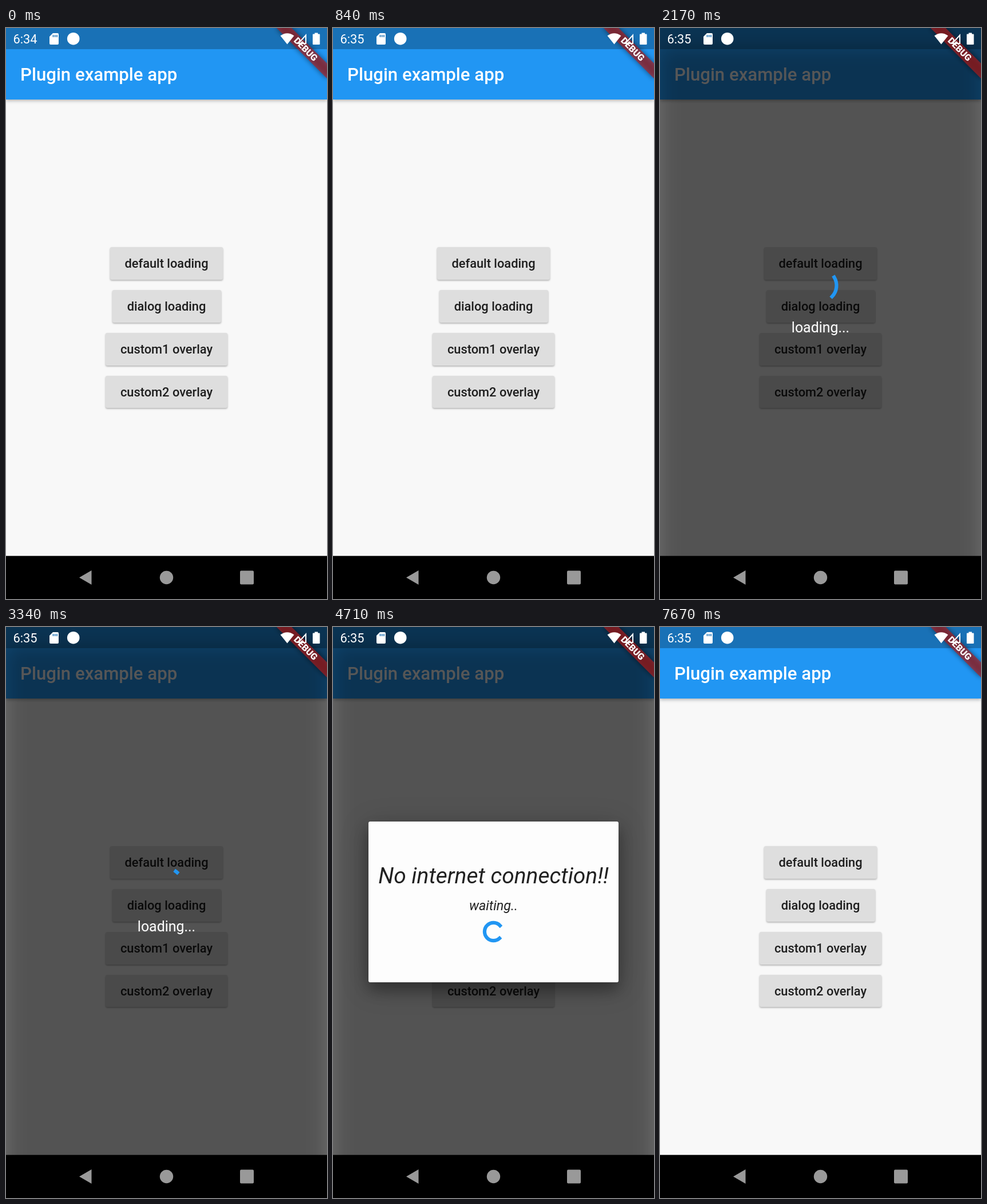
Write an HTML page that moves like this. It is 561 px wide and 998 px high and loops after 8 s.

```html
<!DOCTYPE html>
<html lang="en">
<head>
<meta charset="utf-8">
<style>
html, body { margin: 0; width: 100%; height: 100%; overflow: hidden; background: #000; }
#stage { position: relative; width: 561px; height: 998px; overflow: hidden; font-family: Roboto, sans-serif; }
#stage div, #stage svg { position: absolute; box-sizing: border-box; }
#app { width: 561px; height: 923px; background: #f8f8f8; overflow: hidden; }
#bar { width: 561px; height: 124.6px; background: #2196f3; box-shadow: 0 2px 6px rgba(0,0,0,.3); }
#status { width: 561px; height: 37.4px; background: rgba(0,0,0,.25); }
#title { left: 25px; top: 62px; font: 500 31.17px/40px Roboto, sans-serif; color: #fff; white-space: nowrap; }
.btn { height: 56.5px; border-radius: 3px; background: #dedede; overflow: hidden; text-align: center;
  font: 500 21.82px/58px Roboto, sans-serif; color: rgba(0,0,0,.87); white-space: nowrap; }
.ink, .splash { inset: 0; background: rgba(188,188,188,.4); opacity: 0; }
.splash { border-radius: 50%; inset: auto; left: 50%; top: 50%; background: rgba(200,200,200,.4); }
.overlay { width: 561px; height: 923px; overflow: hidden; opacity: 0; }
.scrim { inset: 0; background: rgba(0,0,0,.54); }
.shade { left: 0; top: 34px; width: 561px; height: 1000px; background: rgba(0,0,0,.26); filter: blur(17px); }
.line { left: 0; width: 100%; text-align: center; white-space: nowrap; }
#card { left: 62px; top: 340px; width: 437px; height: 281px; border-radius: 3px; background: #fdfdfd;
  box-shadow: 0 14px 24px rgba(0,0,0,.3), 0 8px 50px rgba(0,0,0,.22); color: rgba(0,0,0,.87); font-style: italic; }
.arc { fill: none; stroke: #2196f3; stroke-width: 6.2; stroke-linecap: square; }
</style>
</head>
<body>
<div id="stage">
  <div id="app">
    <div id="bar"><div id="status"></div><div id="title">Plugin example app</div></div>
  </div>

  <div class="overlay">
    <div class="scrim"></div><div class="shade"></div>
    <div class="line" style="top:509px;font-size:24.9px;line-height:30px;color:#fff">loading...</div>
    <svg width="561" height="923"><path class="arc"/></svg>
  </div>

  <div class="overlay">
    <div class="scrim"></div><div class="shade"></div>
    <div id="card">
      <div class="line" style="top:70px;font-size:38.96px;line-height:50px">No internet connection!!</div>
      <div class="line" style="top:132px;font-size:23.4px;line-height:30px">waiting..</div>
    </div>
    <svg width="561" height="923"><path class="arc"/></svg>
  </div>

  <svg width="561" height="998" font-family="Roboto, sans-serif">
    <g transform="translate(523.5 37.5) rotate(45)">
      <rect x="-62" y="-9.35" width="124" height="18.7" fill-opacity=".5" style="filter:blur(5px)"/>
      <rect x="-62" y="-9.35" width="124" height="18.7" fill="#b71c1c" fill-opacity=".63"/>
      <text y="5" text-anchor="middle" font-size="15.9" font-weight="900" fill="#fff">DEBUG</text>
    </g>
    <g fill="#fff">
      <text id="clock" x="12.5" y="27.4" font-size="21.8"></text>
      <path d="M82 9h8q2 0 2 2v16q0 2-2 2h-12q-2 0-2-2v-12z"/>
      <path d="M82.5 12v4M85.7 12v4M89 12v4" stroke="#1971b6" stroke-width="1.6"/>
      <circle cx="117.7" cy="18.7" r="10.8"/>
      <path d="M479.500 13.500q12-8.500 24 0L491.500 28.500z"/>
      <path d="M524 12.500V27H511z" fill="none" stroke="#fff" stroke-width="2"/>
      <path d="M539.500 8.500h5.500v2h2.500q1 0 1 1v16.500q0 1-1 1h-10.500q-1 0-1-1v-16.500q0-1 1-1h2.500z"/>
    </g>
    <rect y="922.7" width="561" height="76"/>
    <g fill="#999">
      <path d="M128 960.500L149.500 948V973z"/>
      <circle cx="280.500" cy="960.500" r="11.700"/>
      <rect x="409" y="948.500" width="24" height="24" rx="2"/>
    </g>
  </svg>
</div>

<script>
const LOOP = 8000, FADE = 150, CENTER = 280.5;
const $ = id => document.getElementById(id);
const clamp = x => Math.max(0, Math.min(1, x));

function bezier(x1, y1, x2, y2) {
  const at = (a, b, s) => 3 * (1 - s) * (1 - s) * s * a + 3 * (1 - s) * s * s * b + s * s * s;
  return x => {
    let lo = 0, hi = 1;
    for (let i = 0; i < 20; i++) {
      const mid = (lo + hi) / 2;
      if (at(x1, x2, mid) < x) lo = mid; else hi = mid;
    }
    return at(y1, y2, lo);
  };
}
const easeOut = bezier(0, 0, .58, 1);
const fastOutSlowIn = bezier(.4, 0, .2, 1);

const buttons = [
  ["default loading", 197.5], ["dialog loading", 190],
  ["custom1 overlay", 212.5], ["custom2 overlay", 212.5]
].map(([label, width], i) => {
  const el = document.createElement("div");
  el.className = "btn";
  el.style.cssText = `left:${CENTER - width / 2}px;top:${383.4 + 74.8 * i}px;width:${width}px`;
  el.innerHTML = `<div class="ink"></div><div class="splash"></div><div class="line">${label}</div>`;
  $("app").append(el);
  return { el, ink: el.children[0], splash: el.children[1], width };
});

const overlays = [...document.querySelectorAll(".overlay")];
const arcs = [...document.querySelectorAll(".arc")];
const shows = [
  { press: 1140, open: 1440, close: 3440, cy: 450, r: 28 },
  { press: 3960, open: 4260, close: 6370, cy: 532.5, r: 15.6 }
];

// The screen stalls here and loses a little time.
const spinTime = t => t < 5250 ? t : t < 5460 ? 5250 : t - 90;

// Arc grows for half a second, then its tail catches up, while the whole turns.
function arcPath(ms, cy, r) {
  const turn = Math.floor(ms / 1000), p = ms / 1000 - turn;
  const head = fastOutSlowIn(clamp(p * 2)), tail = fastOutSlowIn(clamp(p * 2 - 1));
  const start = Math.PI * (-.5 + tail * 1.5 + p * 1.7 - turn * .8);
  const sweep = Math.max((head - tail) * Math.PI * 1.5, .001);
  const point = a => `${CENTER + r * Math.cos(a)} ${cy + r * Math.sin(a)}`;
  return `M${point(start)}A${r} ${r} 0 ${sweep > Math.PI ? 1 : 0} 1 ${point(start + sweep)}`;
}

function pressButton(b, since, after) {
  const amount = clamp(since / 200) * (1 - clamp(after / 200));
  const size = b.width * 1.1 * clamp(since / 500);
  b.ink.style.opacity = b.splash.style.opacity = amount;
  b.splash.style.width = b.splash.style.height = size + "px";
  b.splash.style.margin = `${-size / 2}px`;
  b.el.style.boxShadow = `0 ${1.5 + 5 * amount}px ${3 + 8 * amount}px rgba(0,0,0,.3)`;
}

function draw(t) {
  $("clock").textContent = t < 40 ? "6:34" : "6:35";
  buttons.forEach((b, i) => {
    const s = shows[i];
    pressButton(b, s ? t - s.press : 0, s ? t - s.open : 0);
  });
  shows.forEach((s, i) => {
    const shown = Math.min(clamp((t - s.open) / FADE), 1 - clamp((t - s.close) / FADE));
    overlays[i].style.opacity = easeOut(shown);
    if (shown > 0) arcs[i].setAttribute("d", arcPath(spinTime(t) - s.open, s.cy, s.r));
  });
}

function tick() {
  draw(performance.now() % LOOP);
  requestAnimationFrame(tick);
}
tick();
</script>
</body>
</html>
```
